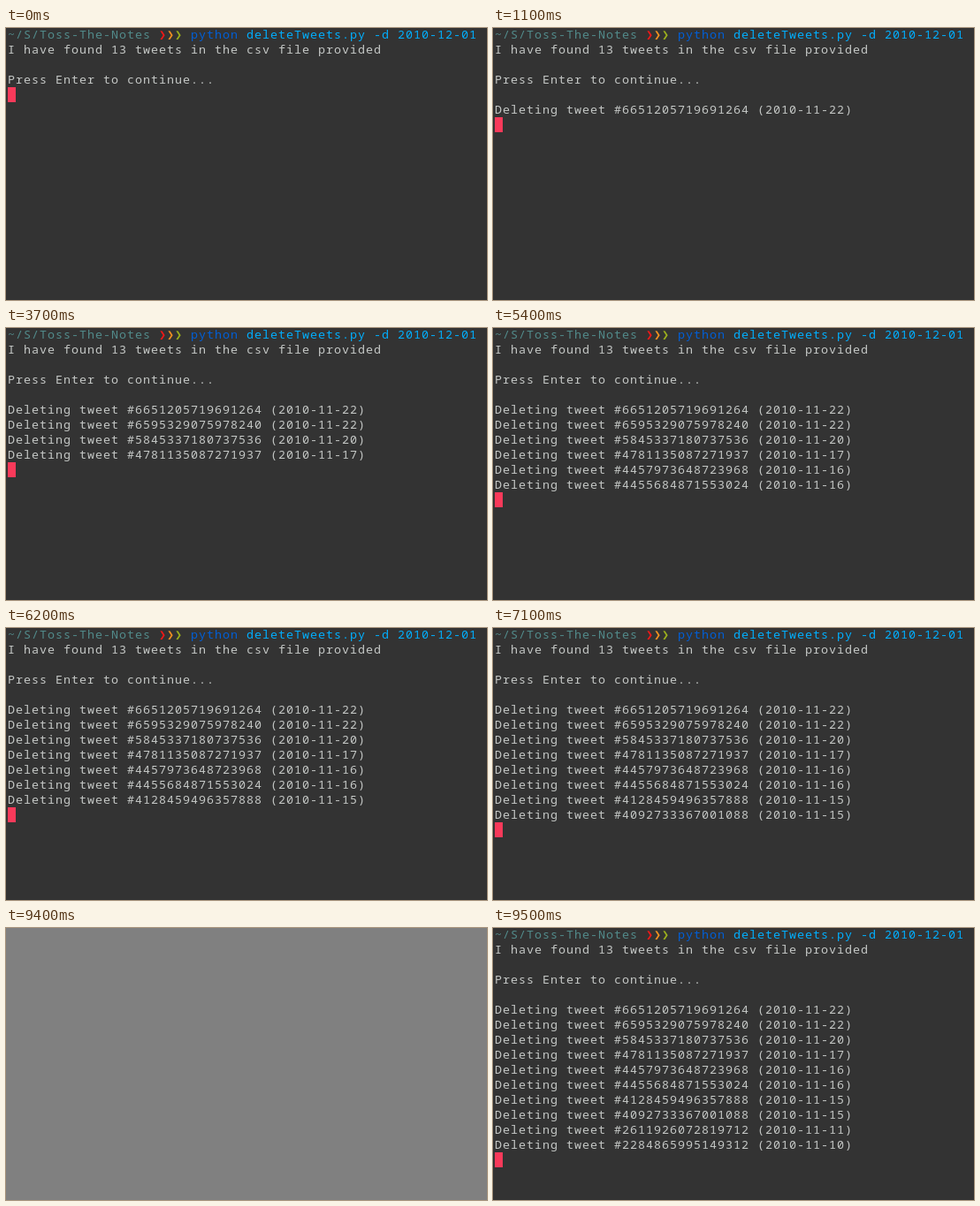
An HTML page with a canvas for the animation above (9.7 s loop, 544 by 308 pixels).

```html
<!DOCTYPE html>
<html lang="en">
<head>
<meta charset="utf-8">
<title>Terminal</title>
<style>
html, body { margin: 0; width: 100%; height: 100%; overflow: hidden; background: #333; }
canvas { display: block; }
</style>
</head>
<body>
<canvas id="screen" width="544" height="308"></canvas>
<script>
const ctx = document.getElementById("screen").getContext("2d");
const W = 544, H = 308, LOOP = 9700;
const CELL = 9, LINE = 17, LEFT = 2, BASE = 12;
const FONT = '13.33px "Noto Sans Mono", "DejaVu Sans Mono", monospace';
const TEXT = "#c5c8c6";

const prompt = [
  ["~/S/Toss-The-Notes ", "#528b8b"],
  ["❯", "#f01818"],
  ["❯", "#f09020"],
  ["❯", "#9cb01c"],
  [" python ", "#005fd7"],
  ["deleteTweets.py -d 2010-12-01", "#00afff"]
];

// time shown, id, day of November
const deletions = [
  [1100, "6651205719691264", 22],
  [2100, "6595329075978240", 22],
  [2900, "5845337180737536", 20],
  [3700, "4781135087271937", 17],
  [4500, "4457973648723968", 16],
  [5400, "4455684871553024", 16],
  [6200, "4128459496357888", 15],
  [7100, "4092733367001088", 15],
  [7900, "2611926072819712", 11],
  [8800, "2284865995149312", 10]
];

function write(text, col, row, color) {
  ctx.fillStyle = color;
  for (const ch of text) {
    if (ch !== " ") ctx.fillText(ch, LEFT + col * CELL, row * LINE + BASE);
    col++;
  }
  return col;
}

function draw(t) {
  const flash = t >= 9400 && t < 9500;
  ctx.fillStyle = flash ? "#808080" : "#333333";
  ctx.fillRect(0, 0, W, H);
  if (flash) return;

  ctx.font = FONT;
  ctx.textBaseline = "alphabetic";
  let col = 0;
  for (const [text, color] of prompt) col = write(text, col, 0, color);
  write("I have found 13 tweets in the csv file provided", 0, 1, TEXT);
  write("Press Enter to continue...", 0, 3, TEXT);

  const done = deletions.filter(d => t >= d[0]);
  done.forEach(([, id, day], i) =>
    write(`Deleting tweet #${id} (2010-11-${day})`, 0, 5 + i, TEXT));

  const row = done.length ? 5 + done.length : 4;
  ctx.fillStyle = "#f93a5a";
  ctx.fillRect(LEFT, row * LINE - 1, CELL, LINE);
}

const start = performance.now();
function tick() {
  draw((performance.now() - start) % LOOP);
  requestAnimationFrame(tick);
}
draw(0);
requestAnimationFrame(tick);
</script>
</body>
</html>
```
